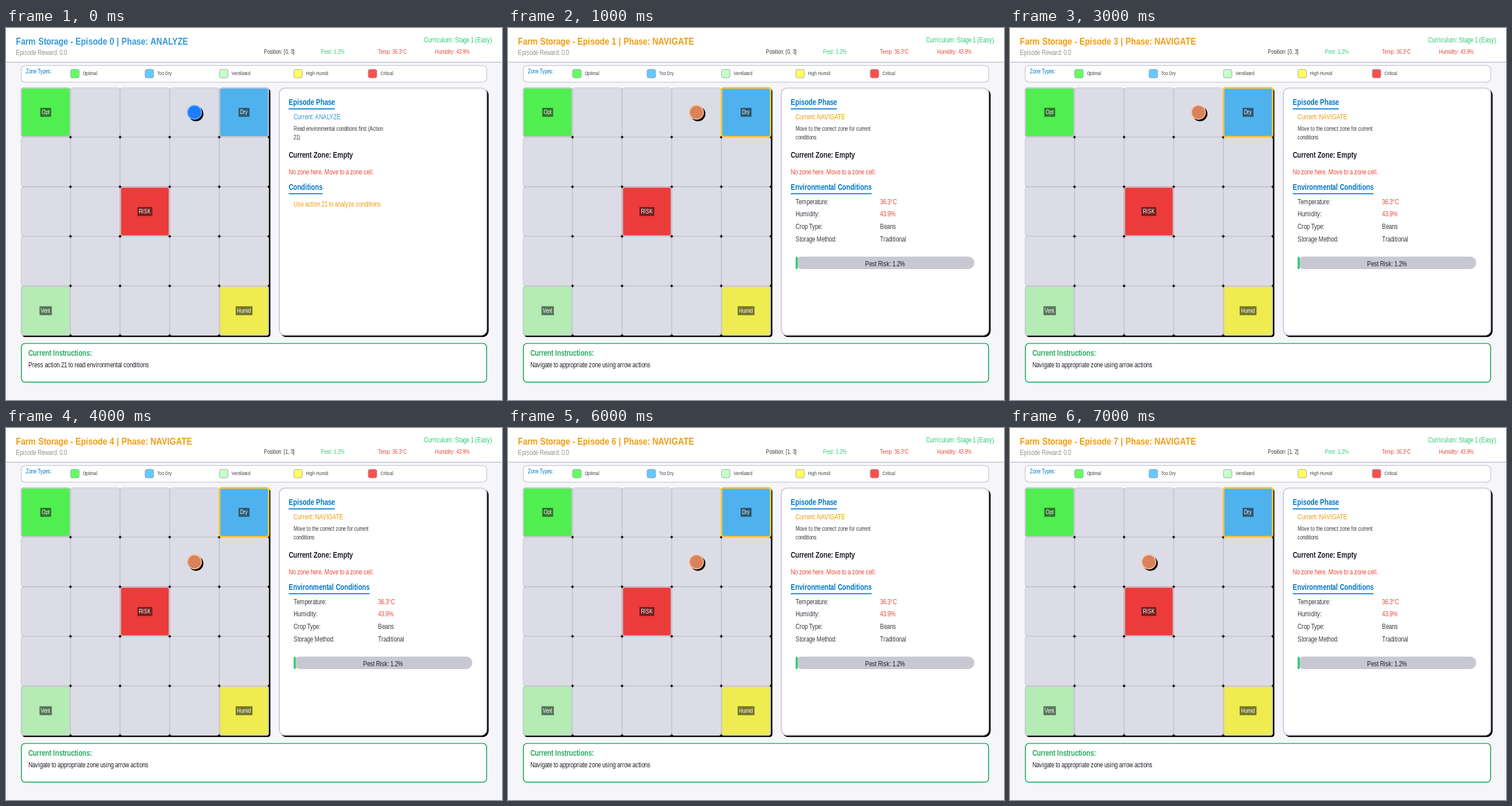
Write an HTML page with a canvas that moves like this. It is 864 by 648 pixels and loops after 8 s.

```html
<!DOCTYPE html>
<html lang="en">
<head>
<meta charset="utf-8">
<title>Farm Storage</title>
<style>
html, body { margin: 0; width: 864px; height: 648px; overflow: hidden; }
canvas { display: block; }
</style>
</head>
<body>
<canvas id="stage" width="864" height="648"></canvas>
<script>
const ctx = document.getElementById('stage').getContext('2d');
const SCALE = 0.864;     // the scene is laid out on 1000 x 750 units
const CONDENSED = 0.82;  // narrow face derived from the regular one
const STEP = 1000;

const GRAY = '#c8c8d2', INK = '#1e1e28', SOFT = '#3c3c46', BLUE = '#3498db', LINK = '#0078c8',
      ORANGE = '#f39c12', GREEN = '#2ecc71', LEAF = '#27ae60', RED = '#e74c3c';

// Agent cell (row, column) in each episode
const path = [[0, 3], [0, 3], [0, 2], [0, 3], [1, 3], [2, 3], [1, 3], [1, 2]];

const zones = [
  { row: 0, col: 0, label: 'Opt', color: '#50ee50' },
  { row: 0, col: 4, label: 'Dry', color: '#50b2ec' },
  { row: 2, col: 2, label: 'RISK', color: '#ec3c3c' },
  { row: 4, col: 0, label: 'Vent', color: '#b4ecb4' },
  { row: 4, col: 4, label: 'Humid', color: '#eeec50' },
];

const legend = [
  ['Optimal', '#64ff64'], ['Too Dry', '#64c8ff'], ['Ventilated', '#c8ffc8'],
  ['High Humid', '#ffff64'], ['Critical', '#ff5050'],
];

const phases = {
  ANALYZE: {
    color: BLUE, agent: ['#1e7dff', '#64b4ff'],
    hint: ['Read environmental conditions first (Action', '21)'],
    instruction: 'Press action 21 to read environmental conditions',
  },
  NAVIGATE: {
    color: ORANGE, agent: ['#d9825c', '#ffbe8c'],
    hint: ['Move to the correct zone for current', 'conditions'],
    instruction: 'Navigate to appropriate zone using arrow actions',
  },
};

// Rounded box with its border kept inside the edges
function box(x, y, w, h, r, fill, border, line = 0) {
  ctx.beginPath();
  ctx.roundRect(x, y, w, h, r);
  if (fill) { ctx.fillStyle = fill; ctx.fill(); }
  if (!line) return;
  ctx.beginPath();
  ctx.roundRect(x + line / 2, y + line / 2, w - line, h - line, Math.max(0, r - line / 2));
  ctx.strokeStyle = border;
  ctx.lineWidth = line;
  ctx.stroke();
}

function disc(x, y, r, fill) {
  ctx.beginPath();
  ctx.arc(x, y, r, 0, 2 * Math.PI);
  ctx.fillStyle = fill;
  ctx.fill();
}

// Text on a baseline, every glyph advance rounded to whole units; returns the width
function text(str, x, y, size, color, { bold = false, align = 0 } = {}) {
  ctx.font = `${bold ? 'bold ' : ''}100px "Liberation Sans", Arial, sans-serif`;
  const unit = size / 100 * CONDENSED;
  const width = s => ctx.measureText(s).width * unit;
  let total = 0;
  const glyphs = [...str].map((char, i) => {
    const next = str[i + 1] || '';
    const at = total;
    const kern = next ? width(char + next) - width(char) - width(next) : 0;
    total += Math.round(width(char)) + Math.round(kern);
    return [char, at];
  });
  const left = x - Math.round(total * align);
  ctx.fillStyle = color;
  for (const [char, at] of glyphs) {
    ctx.save();
    ctx.translate(left + at, y);
    ctx.scale(unit, size / 100);
    ctx.fillText(char, 0, 0);
    ctx.restore();
  }
  return total;
}

function heading(str, y) {
  const width = text(str, 570, y, 16, LINK, { bold: true });
  box(570, y + 7, width, 2, 0, LINK);
}

function drawHeader(episode, name, phase, [row, col]) {
  box(0, 0, 1000, 70, 0, '#fff');
  box(0, 68, 1000, 2, 0, GRAY);
  text(`Farm Storage - Episode ${episode} | Phase: ${name}`, 20, 34, 20, phase.color, { bold: true });
  text('Episode Reward: 0.0', 20, 54, 14, '#969696');
  text('Curriculum: Stage 1 (Easy)', 980, 29, 14, GREEN, { align: 1 });
  text(`Position: [${row}, ${col}]`, 520, 52, 12, SOFT);
  text('Pest: 1.2%', 635, 52, 12, GREEN);
  text('Temp: 36.3°C', 750, 52, 12, RED);
  text('Humidity: 43.9%', 865, 52, 12, RED);
}

function drawLegend() {
  box(30, 75, 940, 35, 8, '#fff', GRAY, 1.5);
  text('Zone Types:', 40, 92, 12, LINK);
  legend.forEach(([label, color], i) => {
    const x = 130 + 150 * i;
    box(x, 83, 18, 18, 4, color, '#a0a0aa', 1);
    text(label, x + 25, 95, 10, SOFT);
  });
}

function drawGrid(navigating) {
  box(33, 123, 500, 500, 5, '#000');
  for (let i = 0; i < 25; i++) {
    box(30 + 100 * (i % 5), 120 + 100 * Math.floor(i / 5), 100, 100, 5, '#dcdce6', GRAY, 1);
  }
  for (const { row, col, label, color } of zones) {
    const x = 30 + 100 * col, y = 120 + 100 * row;
    box(x, y, 100, 100, 5, color, GRAY, 2);
    if (navigating && label === 'Dry') box(x - 1, y - 1, 102, 102, 6, null, '#ffc828', 3);
    const width = { Opt: 16, Dry: 16, RISK: 24, Vent: 19, Humid: 28 }[label] + 6;
    box(x + 50 - width / 2, y + 41, width, 18, 0, 'rgba(0,0,0,.5)');
    text(label, x + 50, y + 54, 12, '#fff', { align: 0.5 });
  }
}

function drawAgent([row, col], [fill, ring]) {
  const x = 80 + 100 * col, y = 170 + 100 * row;
  disc(x + 3, y + 3, 15, '#000');
  disc(x, y, 15, ring);
  disc(x, y, 13, fill);
}

function drawPanel(name, phase) {
  box(553, 123, 420, 500, 12, '#000');
  box(550, 120, 420, 500, 12, '#fff', GRAY, 2);
  heading('Episode Phase', 155);
  text(`Current: ${name}`, 580, 184, 14, phase.color);
  phase.hint.forEach((line, i) => text(line, 580, 207 + 18 * i, 12, SOFT));
  text('Current Zone: Empty', 570, 261, 16, INK, { bold: true });
  text('No zone here. Move to a zone cell.', 570, 295, 14, RED);
  if (name === 'ANALYZE') {
    heading('Conditions', 326);
    text('Use action 21 to analyze conditions', 580, 360, 14, ORANGE);
    return;
  }
  heading('Environmental Conditions', 326);
  const rows = [
    ['Temperature:', '36.3°C', RED], ['Humidity:', '43.9%', RED],
    ['Crop Type:', 'Beans', SOFT], ['Storage Method:', 'Traditional', SOFT],
  ];
  rows.forEach(([label, value, color], i) => {
    text(label, 580, 355 + 25 * i, 14, SOFT);
    text(value, 750, 355 + 25 * i, 14, color);
  });
  box(580, 461, 360, 25, 12, GRAY);
  box(580, 461, 4, 25, 2, GREEN);
  text('Pest Risk: 1.2%', 760, 480, 14, INK, { align: 0.5 });
}

function drawInstructions(phase) {
  box(30, 635, 940, 80, 8, '#fff', LEAF, 2);
  text('Current Instructions:', 45, 661, 16, LEAF, { bold: true });
  text(phase.instruction, 45, 684, 14, INK);
}

function draw(now) {
  const episode = Math.floor(now / STEP) % path.length;
  const name = episode ? 'NAVIGATE' : 'ANALYZE';
  const phase = phases[name], cell = path[episode];
  ctx.setTransform(SCALE, 0, 0, SCALE, 0, 0);
  box(0, 0, 1000, 750, 0, '#f5f5fa');
  drawHeader(episode, name, phase, cell);
  drawLegend();
  drawGrid(name === 'NAVIGATE');
  drawAgent(cell, phase.agent);
  drawPanel(name, phase);
  drawInstructions(phase);
}

let start;
function tick(now) {
  start ??= now;
  draw(now - start);
  requestAnimationFrame(tick);
}
requestAnimationFrame(tick);
</script>
</body>
</html>
```
